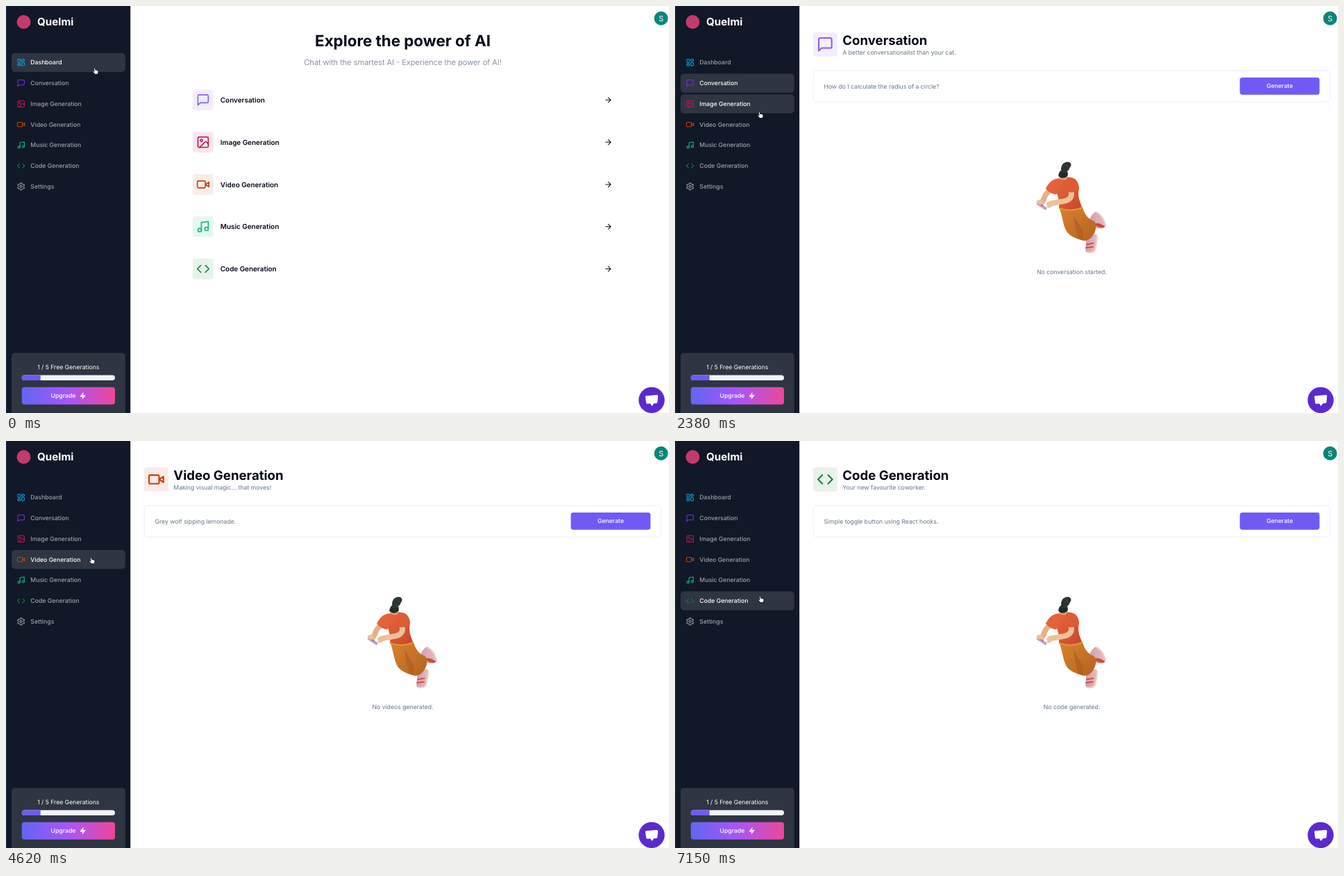
These frames come from a looping animation (955x586 px, 8000 ms). An HTML page:

```html
<!DOCTYPE html>
<html lang="en">
<head>
<meta charset="utf-8">
<title>AI dashboard tour</title>
<style>
  html, body { margin: 0; width: 100%; height: 100%; overflow: hidden; background: #fff; }
  svg { display: block; }
  text { font-family: Inter, "Liberation Sans", sans-serif; text-rendering: geometricPrecision; white-space: pre; }
  .icon { fill: none; stroke-width: 2; stroke-linecap: round; stroke-linejoin: round; }
  .item rect { fill: #fff; fill-opacity: 0; }
  .item text { fill: #a1a1aa; }
  .item.lit > rect { fill-opacity: .125; }
  .item.lit text { fill: #fff; }
  .page { display: none; }
  .page.on { display: inline; }
</style>
</head>
<body>
<svg id="stage" width="955" height="586" viewBox="0 0 955 586">
  <defs>
    <linearGradient id="upgrade">
      <stop offset="0" stop-color="#6366f1"/><stop offset=".5" stop-color="#a855f7"/><stop offset="1" stop-color="#ec4899"/>
    </linearGradient>
    <linearGradient id="shirt" x1="0" y1="0" x2="1" y2="1">
      <stop offset="0" stop-color="#e8683f"/><stop offset="1" stop-color="#c8462a"/>
    </linearGradient>
    <linearGradient id="pants" x1="0" y1="0" x2="1" y2="1">
      <stop offset="0" stop-color="#d9822f"/><stop offset="1" stop-color="#b3631f"/>
    </linearGradient>
    <linearGradient id="shoe" x1="0" y1="0" x2="1" y2="0">
      <stop offset="0" stop-color="#cf9bb0"/><stop offset="1" stop-color="#e6bcc2"/>
    </linearGradient>
    <clipPath id="bar"><rect x="22.8" y="531.4" width="134.2" height="7.5" rx="3.75"/></clipPath>

    <g id="figure" stroke-linecap="round" stroke-linejoin="round">
      <path fill="url(#shoe)" d="M594 313C598 306 601 298 606 296.6C612 297 618 306 620.5 314C621 318.5 617 320.8 612 320.4C606 318.5 599 320 594 313Z"/>
      <path fill="none" stroke="#ecd3bd" stroke-width="2" d="M608 297.6C613 300 617.5 307 619.5 314"/>
      <path fill="#cc4c3c" d="M604 313.5C609 311.5 614 314 619.5 317.5C616 321 608 319.5 604 313.5Z"/>
      <path fill="url(#shoe)" d="M592 337C596 331 603 327 608 329C610 335 607 344 605.5 351C603.5 356.5 596 357 592 354C589.8 349 593 343 592 337Z"/>
      <path fill="none" stroke="#ecd3bd" stroke-width="2" d="M607.6 331C608.4 338 606 346 604.5 352Q601 356 594 354.6"/>
      <path fill="none" stroke="#d14a38" stroke-width="1.8" d="M593 343.4L602.5 341.6M592.4 348L602 346.8"/>
      <path fill="url(#pants)" d="M553 289L586.5 289C590 299 594 306 602 309C608 312 607 320 604.5 326C601 334 594 339.5 587 337.6C578 335 570 332 565 326C559 318 558 301 553 289Z"/>
      <path fill="#a95a1d" fill-opacity=".55" d="M574 298C577 309 582 312 587 323L588 337.6L581 335C577 323 575 311 574 298Z"/>
      <path fill="url(#shirt)" d="M546 251C552 247.5 560 246 568 246.5C577 247.5 581 252 582 262C580.5 269 581 275 583 281L586.3 290C577 295 562 295.5 553.4 291C553 283 553 276 550 270L546 262Z"/>
      <path fill="none" stroke="#e39a36" stroke-width="1.8" d="M554 291.2Q570 297 586.6 290.2"/>
      <path fill="none" stroke="#e5b08a" stroke-width="7.6" d="M541 265Q533 270 531 279L527.5 284"/>
      <path fill="#e2633b" d="M552 248.6C542 249.5 537.5 256 534 263C538 268 543 270.5 549 271.5L555 258Z"/>
      <path fill="none" stroke="#edc198" stroke-width="7.8" d="M570.6 267C572.5 275.5 568 280 558 281.4L541 284.4"/>
      <path fill="#dd5c36" d="M566 247.5C576 246.5 581.8 253 581.6 264C577 268.5 570 269.5 564 267C562 260 562 252 566 247.5Z"/>
      <path fill="none" stroke="#c7a0b8" stroke-width="4" stroke-linecap="butt" d="M521.5 283.5L535 292.5"/>
      <path fill="none" stroke="#5d4a62" stroke-width="1" d="M522.5 282.8L530 287.8"/>
      <path fill="#edc198" d="M520.5 282C522 278 528 278 531 281L529 286L524 285.5Z"/>
      <path fill="#edc198" d="M535 284C538 281 544 281 545 285C543 289 540 291.5 536.5 290.6Z"/>
      <path fill="#dfa57d" d="M553.5 243L565 243L564 249.4Q558.5 251.5 554 248.8Z"/>
      <path fill="#232b28" d="M552.2 244.4C553 238.5 556 235.4 560 235.2C564.5 235.8 566.7 239.5 565.6 244.6C562.5 248.4 556 249.2 552.2 244.4Z"/>
      <path fill="#2b3430" d="M556 235.5C556 231.5 558 226.5 561.5 225.5C566 223 571.5 225.5 570.4 229.5C569.5 232.5 568.2 233 567.2 236C564.5 239.4 558.5 239 556 235.5Z"/>
      <path fill="none" stroke="#48534d" stroke-width=".8" d="M561 227.5Q565 228.5 566.5 231.6M557.5 240Q560 237.5 564 239"/>
    </g>
  </defs>
</svg>
<script>
const S = 0.6205;
const SMALL = 14 * S;
const INK = '#020817', MUTED = '#64748b', PRIMARY = '#6f5af6', LINE = '#e2e8f0';
const LOOP = 8000;

// Icon shapes on a 24-unit grid
const path = d => `<path d="${d}"/>`;
const circle = (x, y, r) => `<circle cx="${x}" cy="${y}" r="${r}"/>`;
const box = (x, y, w, h, r) => `<rect x="${x}" y="${y}" width="${w}" height="${h}" rx="${r}"/>`;

function gear() {
  let d = '';
  for (let i = 0; i < 72; i++) {
    const a = i / 72 * 2 * Math.PI;
    const r = 8.7 + 1.4 * Math.max(-1, Math.min(1, 1.5 * Math.cos(6 * a)));
    d += `${i ? 'L' : 'M'}${(12 + r * Math.sin(a)).toFixed(2)} ${(12 - r * Math.cos(a)).toFixed(2)}`;
  }
  return path(d + 'Z');
}

const ICONS = {
  dashboard: box(3, 3, 7, 9, 1) + box(14, 3, 7, 5, 1) + box(14, 12, 7, 9, 1) + box(3, 16, 7, 5, 1),
  chat: path('M21 15a2 2 0 0 1-2 2H7l-4 4V5a2 2 0 0 1 2-2h14a2 2 0 0 1 2 2z'),
  image: box(3, 3, 18, 18, 2) + circle(9, 9, 2) + path('m21 15-3.086-3.086a2 2 0 0 0-2.828 0L6 21'),
  video: path('m22 8-6 4 6 4V8Z') + box(2, 6, 14, 12, 2),
  music: path('M9 18V5l12-2v13') + circle(6, 18, 3) + circle(18, 16, 3),
  code: path('m16 18 6-6-6-6M8 6l-6 6 6 6'),
  settings: gear() + circle(12, 12, 3),
  arrow: path('M5 12h14M12 5l7 7-7 7'),
  chevron: path('m6 9 6 6 6-6'),
  zap: path('M13 2 3 14h9l-1 8 10-12h-9l1-8z')
};

const icon = (name, cx, cy, size, color, extra = '') => {
  const k = size * S / 24;
  return `<g class="icon" stroke="${color}" ${extra} transform="translate(${cx - 12 * k} ${cy - 12 * k}) scale(${k})">${ICONS[name]}</g>`;
};
const rect = (x, y, w, h, r, attrs) => `<rect x="${x}" y="${y}" width="${w}" height="${h}" rx="${r}" ${attrs}/>`;
const text = (s, x, y, size, weight, fill, anchor = 'start') =>
  `<text x="${x}" y="${y}" font-size="${size}" font-weight="${weight}" text-anchor="${anchor}"${fill ? ` fill="${fill}"` : ''}>${s}</text>`;
const outline = (x, y, w, h, r) => rect(x, y, w, h, r, `fill="none" stroke="${LINE}" stroke-width=".75"`);

const MENU = [
  ['Dashboard', 'dashboard', '#0ea5e9'],
  ['Conversation', 'chat', '#7232e0'],
  ['Image Generation', 'image', '#be185d'],
  ['Video Generation', 'video', '#c2410c'],
  ['Music Generation', 'music', '#10b981'],
  ['Code Generation', 'code', '#15803d'],
  ['Settings', 'settings', '#a1a1aa']
];

const TOOLS = [
  ['Conversation', 'chat', '#8b5cf6', 'A better conversationalist than your cat.',
    'How do I calculate the radius of a circle?', 'No conversation started.'],
  ['Image Generation', 'image', '#be185d', 'Your imagination comes to life!',
    'A cartoon of a giraffe wearing overalls.', 'No images generated.'],
  ['Video Generation', 'video', '#c2410c', 'Making visual magic... that moves!',
    'Grey wolf sipping lemonade.', 'No videos generated.'],
  ['Music Generation', 'music', '#10b981', 'A wedding DJ that actually takes requests.',
    'Jazzy piano solo.', 'No tunes generated.'],
  ['Code Generation', 'code', '#15803d', 'Your new favourite coworker.',
    'Simple toggle button using React hooks.', 'No code generated.']
];

function sidebar() {
  const items = MENU.map(([label, name, color], i) => {
    const cy = 81.3 + 29.76 * i;
    return `<g class="item">${rect(8, cy - 13.65, 163.8, 27.3, 5, '')}` +
      icon(name, 21.7, cy, 20, color) + text(label, 35.3, cy + 3.1, SMALL, 500) + '</g>';
  }).join('');
  return rect(0, 0, 179.2, 586, 0, 'fill="#111827"') +
    rect(0, 0, 1.2, 586, 0, 'fill="#1a2f4b"') +
    '<circle cx="25.5" cy="23" r="10" fill="#c43a6c"/>' +
    text('Quelmi', 45, 28.2, 15.2, 700, '#fff') + items +
    rect(8, 499.4, 163.8, 95, 5, 'fill="#fff" fill-opacity=".125"') +
    text('1 / 5 Free Generations', 89.8, 523.3, SMALL, 400, '#fff', 'middle') +
    `<g clip-path="url(#bar)">${rect(22, 531, 136, 9, 0, 'fill="#f1f5f9"')}${rect(22, 531, 27.7, 9, 0, `fill="${PRIMARY}"`)}</g>` +
    rect(22.8, 548.8, 134.2, 24.9, 3.7, 'fill="url(#upgrade)"') +
    text('Upgrade', 64.5, 564.3, SMALL, 500, '#fff') +
    icon('zap', 110.6, 561.3, 16, '#fff', 'style="fill:#fff"');
}

function dashboard() {
  return text('Explore the power of AI', 571.5, 58.2, 36 * S, 700, INK, 'middle') +
    text('Chat with the smartest AI - Experience the power of AI!', 571.5, 85, 18 * S, 300, MUTED, 'middle') +
    TOOLS.map(([label, name, color], i) => {
      const cy = 135.3 + 60.8 * i;
      return rect(269, cy - 14.9, 29.8, 29.8, 3.7, `fill="${color}" fill-opacity=".1"`) +
        icon(name, 283.9, cy, 32, color) +
        text(label, 308.8, cy + 3.6, 16 * S, 600, INK) +
        icon('arrow', 867.5, cy, 20, INK);
    }).join('');
}

const select = (x, label) => outline(x, 103.1, 114.3, 24.6, 3.7) +
  text(label, x + 7.8, 118.4, SMALL, 400, INK) + icon('chevron', x + 101.6, 115.3, 16, INK, 'opacity=".5"');

function tool([label, name, color, tagline, prompt, empty]) {
  return rect(199, 38, 34.8, 34.6, 3.7, `fill="${color}" fill-opacity=".1"`) +
    icon(name, 216.4, 55.3, 40, color) +
    text(label, 241.3, 55.8, 30 * S, 700, INK) +
    text(tagline, 241.3, 69.5, SMALL, 400, MUTED) +
    outline(199.2, 93, 744.5, 45.2, 5) +
    text(prompt, 214.5, 119, SMALL, 400, MUTED) +
    (name === 'image' ? select(574.3, '1 Image') + select(694, '512×512') : '') +
    rect(813.6, 102.9, 114.8, 24.9, 3.7, `fill="${PRIMARY}"`) +
    text('Generate', 871, 118.4, SMALL, 500, '#fff', 'middle') +
    '<use href="#figure"/>' +
    text(empty, 571.5, 385.6, SMALL, 400, MUTED, 'middle');
}

const overlay = '<circle cx="943.6" cy="17.8" r="10" fill="#0b8578"/>' +
  text('S', 943.6, 21.7, 10.8, 400, '#fff', 'middle') +
  '<circle cx="930" cy="567.4" r="18.7" fill="#5b2acf"/>' +
  '<path fill="#fff" d="M922.3 561.2L937.6 560Q939.2 560 939.2 561.5L938.4 570.6Q938.2 572 936.8 572.1L933.4 572.3L930.4 576L928.2 572.6L923.8 572.8Q922.4 572.8 922.2 571.4L920.9 562.8Q920.8 561.3 922.3 561.2Z"/>';

const hand = '<g id="cursor"><path fill="#fff" stroke="#000" stroke-width=".75" stroke-linejoin="round" ' +
  'd="M-2.7-3.8Q-1.6-5.2-.8-3.7L-.2-1.5L1.1-1.5L2.4-1L3.5-.5Q4.2.1 4 1.4L3.5 3L3 4.6H-1.2L-2.4 2.7L-4 1Q-4.3-.3-3-.1L-1.8.9Z"/></g>';

const pages = [dashboard(), ...TOOLS.map(tool)].map(p => `<g class="page">${p}</g>`).join('');
document.getElementById('stage').insertAdjacentHTML('beforeend', pages + sidebar() + overlay + hand);

// Step tracks: [start ms, value...]
const PAGE = [[0, 0], [1640, 1], [3280, 2], [4470, 3], [5810, 4], [7150, 5]];
const ACTIVE = [[0, 0], [1790, 1], [3280, 2], [4620, 3], [5810, 4], [7150, 5]];
const HOVER = [[0, 0], [1050, 1], [2380, 2], [4020, 3], [5360, 4], [6250, 5]];
const POINTER = [
  [0, 129, 93.6], [750, 129, 95.6], [900, 128, 105], [1050, 126.3, 117.4], [1350, 125.9, 118],
  [2240, 124.9, 134], [2380, 123, 156.9], [3870, 123.2, 165.2], [4020, 124, 171], [4170, 124, 172.2],
  [5060, 124, 185], [5210, 124, 194], [6100, 124, 224], [6250, 124, 227], [6400, 124, 228]
];
const at = (track, t) => track.findLast(step => step[0] <= t);

const pageNodes = document.querySelectorAll('.page');
const itemNodes = document.querySelectorAll('.item');
const cursor = document.getElementById('cursor');

function draw(t) {
  const page = at(PAGE, t)[1], active = at(ACTIVE, t)[1], hover = at(HOVER, t)[1];
  const [, x, y] = at(POINTER, t);
  pageNodes.forEach((n, i) => n.classList.toggle('on', i === page));
  itemNodes.forEach((n, i) => n.classList.toggle('lit', i === active || i === hover));
  cursor.setAttribute('transform', `translate(${x} ${y})`);
}

const start = performance.now();
function tick() {
  draw((performance.now() - start) % LOOP);
  requestAnimationFrame(tick);
}
tick();
</script>
</body>
</html>
```
